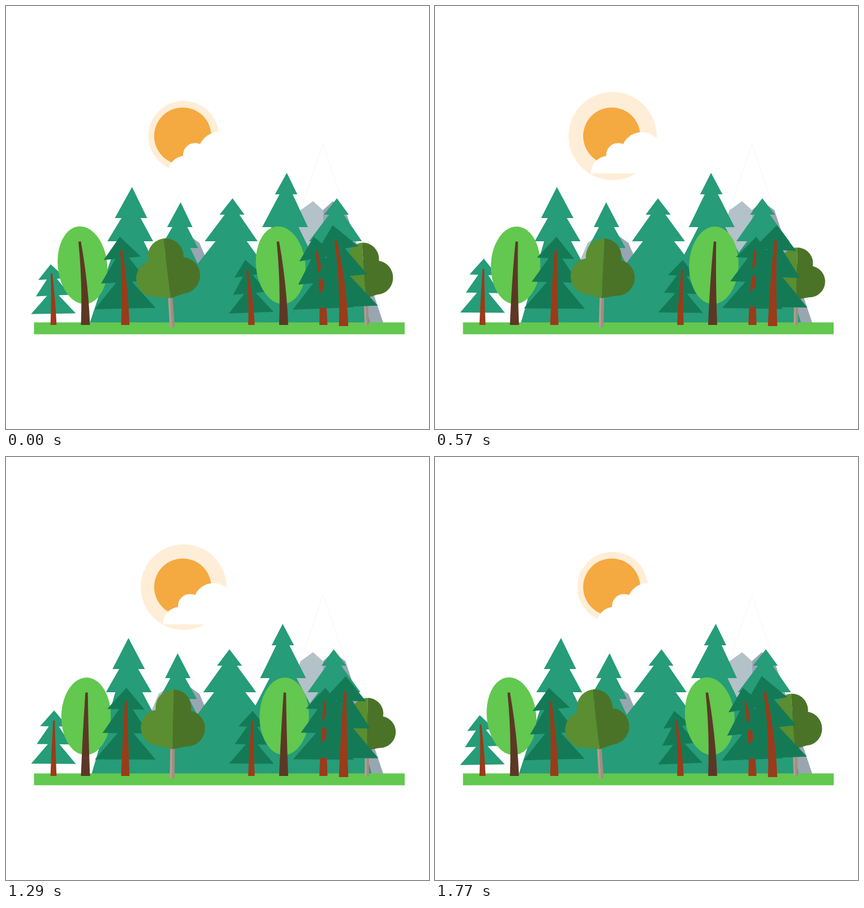
Animation, 748 px wide and 748 px high, one loop 1.8 s. Source, as an HTML page:

```html
<!DOCTYPE html>
<html lang="en">
<head>
<meta charset="utf-8">
<title>Swaying forest</title>
<style>
  html, body { margin: 0; width: 100%; height: 100%; overflow: hidden; background: #fff; }
  svg { display: block; width: 100%; height: 100%; }
</style>
</head>
<body>
<svg viewBox="0 0 748 748">
  <circle id="halo" cx="314" cy="230" fill="#ffeed7"/>
  <circle cx="312.5" cy="230" r="50.5" fill="#f5a941"/>
  <g id="cloud" fill="#fff">
    <circle cx="376" cy="259" r="36"/>
    <circle cx="334.4" cy="263.5" r="21.3"/>
    <path d="M286 296A31 31 0 0 1 317 265L340 245H470V296Z"/>
  </g>
  <g id="mountains"></g>
  <g id="back"></g>
  <rect x="49.5" y="559.5" width="655.5" height="21" fill="#62c84f"/>
  <g id="front"></g>
</svg>
<script>
const LOOP = 1800, STEP = 30, GROUND = 560;
const TEAL = '#269c78', PINE = '#147a56', LEAF = '#62c84f', RUST = '#9a3b1a', BARK = '#5c3824';
const byId = id => document.getElementById(id);
const parts = [];

const toPath = pts => 'M' + pts.map(([x, y]) => x.toFixed(2) + ' ' + y.toFixed(2)).join('L');
const flip = pts => pts.map(([u, h]) => [-u, h]);
const mirror = half => [...half, ...flip(half).reverse()];
const range = (n, fn) => Array.from({ length: n }, (_, i) => fn(i));

function addPath(layer, fill, pts = []) {
  const el = document.createElementNS('http://www.w3.org/2000/svg', 'path');
  el.setAttribute('fill', fill);
  el.setAttribute('d', toPath(pts));
  byId(layer).appendChild(el);
  return el;
}

// White cap with a thin outline above two grey halves with one shoulder each
function mountain(x, top, slope, shoulder) {
  const w = slope * (shoulder - top), foot = slope * (GROUND - top);
  const cap = addPath('mountains', 'none', [[x - w, shoulder], [x, top], [x + w, shoulder]]);
  cap.setAttribute('stroke', '#f3f3f3');
  cap.setAttribute('stroke-width', .8);
  for (const [side, fill] of [[-1, '#b3c1c9'], [1, '#98a6b2']])
    addPath('mountains', fill, [[0, GROUND], [0, shoulder], [.44 * w, shoulder - .4 * w],
      [w, shoulder], [foot, GROUND]].map(([u, y]) => [x + side * u, y]));
}

// Two tiers ending at y1 and y2 over a wide foot that stays inside the wood
function backPine(x, top, y1, y2, slope) {
  const notch = .59, w1 = slope * (y1 - top), w2 = .81 * slope * (y2 - top);
  const half = [[0, top], [w1, y1], [w1 * notch, y1], [w2, y2], [w2 * notch, y2],
    [w2 * notch + slope * (GROUND - y2), GROUND]];
  addPath('back', TEAL, mirror(half).map(([u, y]) =>
    [Math.min(646, Math.max(151, x + u)), y]));
}

mountain(560.5, 243, .336, 361);
mountain(306, 335, .43, 419);
mountain(437, 382, .33, 450);

backPine(217.6, 320, 375, 416, .52);
backPine(304.4, 347, 391, 428, .51);
backPine(396, 340, 369, 416, .76);
backPine(490.5, 295, 333, 391, .52);
backPine(580.5, 340, 369, 416, .76);

// Shapes of a near tree are points [sideways, height] around its foot
const addPart = (tree, fill, pts) => parts.push({ tree, pts, el: addPath('front', fill) });

const oval = (cx, cy, rx, ry, turn = 2 * Math.PI) => range(49, i => {
  const a = turn * i / 48;
  return [cx + rx * Math.sin(a), cy + ry * Math.cos(a)];
});

const trunk = (height, topHalf, footHalf) => mirror(range(7, i =>
  [topHalf + (footHalf - topHalf) * i / 6, height * (1 - i / 6)]));

// Three tiers, each wider and deeper than the one above
function pine(tree, fill, height, size, footHalf) {
  const drop = i => i * (36 + 2.1 * i);
  const half = range(3, n => {
    const i = n + 1;
    return [[n && 10 + 2 * n, drop(n)], [30.4 + 2.6 * i * i, drop(i)]];
  }).flat();
  addPart(tree, fill, mirror(half.map(([u, v]) => [u * size, height - v * size])));
  addPart(tree, RUST, trunk(height - 24 * size, 2 * size, footHalf));
}

function ovalTree(tree) {
  addPart(tree, LEAF, oval(0, 105.5, 43.7, 68.5));
  addPart(tree, BARK, trunk(147.5, 2.2, 8));
}

function cloverTree(tree, size) {
  for (const [side, bark, leaf] of [[-1, '#b59b90', '#5a8e30'], [1, '#a48b80', '#4a7328']]) {
    const add = (fill, pts) => addPart(tree, fill,
      pts.map(([u, h]) => [Math.max(u, 0) * side * size, h * size]));
    add(bark, [[0, 0], [0, 60], [4, 60], [4.3, 0]]);
    add(leaf, oval(0, 125.5, 31.5, 31.5, Math.PI));
    add(leaf, oval(24.7, 89, 32, 32));
    add(leaf, [[0, 125], [24, 110], [24, 57], [0, 51.5]]);
  }
}

// bend: curvature range; cap: height above which the crown turns rigidly; grow: vertical stretch
const tree = (x, y, bend, cap = 1e3, grow = 0) => ({ x, y, bend, cap, grow });

pine(tree(84, 564, .00086, 1e3, .125), TEAL, 114.5, .735, 5.4);
ovalTree(tree(140.5, 564, .00094));
pine(tree(211, 564, .0008), PINE, 156, 1, 7.4);
cloverTree(tree(293.8, 568.3, .002, 60), 1);
pine(tree(434, 564, .00166), PINE, 115, .735, 5.8);
ovalTree(tree(491, 564, .00094));
cloverTree(tree(638, 564.5, .00135, 53, -.088), .89);
pine(tree(561.3, 564, .00142), PINE, 156, 1, 7.2);
pine(tree(597, 566, .00122), PINE, 178.5, 1.14, 8.3);

function place([u, h], t, sway) {
  h *= 1 + t.grow * sway;
  const curve = t.bend * sway, low = Math.min(h, t.cap), turn = 2 * curve * low;
  return [
    t.x + curve * low * low + turn * (h - low) + u * Math.cos(turn),
    t.y - h + u * Math.sin(turn)
  ];
}

function render(ms) {
  const time = Math.floor(ms % LOOP / STEP) * STEP;
  const s = 1 - Math.abs(1 - 2 * time / LOOP);
  const p = s * s * (3 - 2 * s), sway = p - .5;
  byId('halo').setAttribute('r', 62.3 + 22.5 * p);
  byId('cloud').setAttribute('transform', `translate(${-15 * p} 0)`);
  // The far wood leans around a line above the ground
  const skew = .066 * sway, pivot = 480;
  byId('back').setAttribute('transform', `matrix(1 0 ${skew} 1 ${-skew * pivot} 0)`);
  for (const { tree, pts, el } of parts)
    el.setAttribute('d', toPath(pts.map(pt => place(pt, tree, sway))));
}

const start = performance.now();
function tick() {
  render(performance.now() - start);
  requestAnimationFrame(tick);
}
render(0);
requestAnimationFrame(tick);
</script>
</body>
</html>
```
